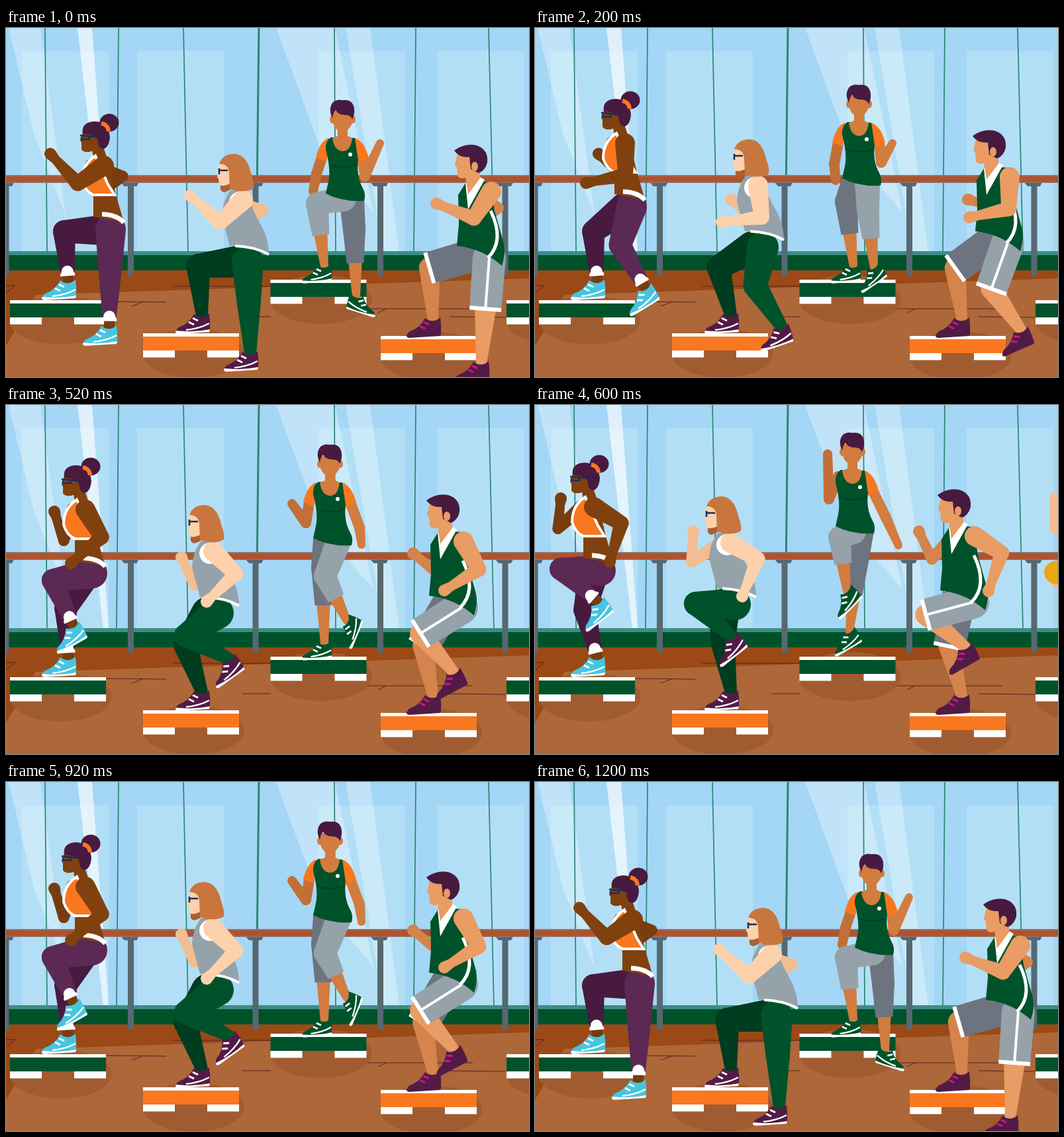
These frames come from a looping animation (790 by 527 pixels, 1.4 s). An HTML page with a canvas:

```html
<!DOCTYPE html>
<html lang="en">
<head>
<meta charset="utf-8">
<title>Step class</title>
<style>
html, body { margin: 0; width: 100%; height: 100%; overflow: hidden; }
canvas { display: block; width: 100%; height: 100%; }
</style>
</head>
<body>
<canvas id="stage" width="790" height="527"></canvas>
<script>
const ctx = document.getElementById('stage').getContext('2d');

const white = '#fff', orange = '#f9771f', green = '#00522b', deepGreen = '#003c1f';
const plum = '#481a40', violet = '#5b2953', grey = '#95a2aa', slate = '#6d747f', navy = '#1c2c5a';
const brown = '#81410f', umber = '#773c10', peach = '#fdd1ab', rose = '#f2bd91';
const tan = '#d27c3f', copper = '#c26f37', sand = '#e99c63', clay = '#d4844c';
const cyanShoe = ['#46c5e0', white, white], plumShoe = ['#521b46', white, white];
const greenShoe = [green, white, white], pinkShoe = ['#521b46', '#521b46', '#d3148c'];

function shape(color, d) {
  ctx.fillStyle = color;
  ctx.fill(new Path2D(d));
}

function line(color, width, d) {
  ctx.strokeStyle = color;
  ctx.lineWidth = width;
  ctx.stroke(new Path2D(d));
}

function rect(color, x, y, w, h) {
  ctx.fillStyle = color;
  ctx.fillRect(x, y, w, h);
}

function oval(color, x, y, rx, ry = rx) {
  ctx.fillStyle = color;
  ctx.beginPath();
  ctx.ellipse(x, y, rx, ry, 0, 0, 7);
  ctx.fill();
}

function at([x, y], draw, angle = 0, size = 1) {
  ctx.save();
  ctx.translate(x, y);
  ctx.rotate(angle * Math.PI / 180);
  ctx.scale(size, Math.abs(size));
  draw();
  ctx.restore();
}

const add = (a, b) => [a[0] + b[0], a[1] + b[1]];
const mix = (a, b, t) => [a[0] + (b[0] - a[0]) * t, a[1] + (b[1] - a[1]) * t];

// Middle joint of a two-bone limb from a to b; side picks which way it folds
function joint(a, b, upper, lower, side) {
  const dx = b[0] - a[0], dy = b[1] - a[1], d = Math.hypot(dx, dy);
  const along = (d * d + upper * upper - lower * lower) / (2 * d);
  const out = side * Math.sqrt(Math.max(0, upper * upper - along * along));
  return [a[0] + (dx * along - dy * out) / d, a[1] + (dy * along + dx * out) / d];
}

// Tapered chain of circles: point, radius, point, radius...
function limb(color, ...n) {
  ctx.fillStyle = color;
  for (let i = 0; i + 3 < n.length; i += 2) {
    const [[x, y], r, [u, v], q] = n.slice(i, i + 4);
    const a = Math.atan2(v - y, u - x);
    const b = Math.acos((r - q) / Math.hypot(u - x, v - y));
    ctx.beginPath();
    ctx.arc(x, y, r, a + b, a - b + 2 * Math.PI);
    ctx.arc(u, v, q, a - b, a + b);
    ctx.fill();
  }
}

// Cloth from a to b, round at a and cut straight at b, with an optional hem
function sleeve(color, a, r, b, q, hem = 0) {
  const length = Math.hypot(b[0] - a[0], b[1] - a[1]);
  const angle = Math.atan2(b[1] - a[1], b[0] - a[0]) * 180 / Math.PI;
  at(a, () => {
    shape(color, `M0 ${-r} A${r} ${r} 0 0 0 0 ${r} L${length} ${q} V${-q}Z`);
    if (hem) line(white, hem, `M${length} ${-q} V${q}`);
  }, angle);
}

// Origin at the ankle, toe to the left
function shoe([body, sole, stripe], [x, y, angle = 0, size = 1]) {
  at([x, y], () => {
    shape(body, 'M11 -3 Q13 10 12 23 L-37 27 Q-42 23 -35 18 Q-20 13 -12 -2 Q0 7 11 -3Z');
    shape(sole, 'M12 21 L11 25 L-36 28 Q-42 27 -39 23 Q-12 26 12 21Z');
    line(sole, 2.5, 'M-24 22 Q-4 20 11 12');
    line(stripe, 3, 'M-20 10 L-12 14 M-14 4 L-6 8');
  }, angle, size);
}

function scenery() {
  rect('#a4d6f6', 0, 0, 790, 340);
  for (const x of [24, 198, 472, 652]) rect('#b3dff6', x, 35, 131, 302);
  shape('rgba(255,255,255,.3)', 'M4 0 H52 L90 282 L42 160Z M408 0 H497 L555 278 L478 190Z M513 0 H550 L594 337 H570Z');
  shape('rgba(255,255,255,.65)', 'M108 0 H130 L155 337 H147Z');
  line('#2a8673', 1.7, 'M59 0 L62 337 M170 0 L167 337 M268 0 L275 337 M496 0 L498 337 M619 0 L616 337 M729 0 L737 337');
  line('#2a8673', 3, 'M382 0 L378 337');
  rect('#3d8e83', 0, 337, 790, 6);
  rect(green, 0, 343, 790, 23);
  rect('#9b4916', 0, 366, 790, 161);
  shape('#ad6738', 'M45 403 L790 378 V527 H0 V480Z');
  for (let i = 0; i < 5; i++) {
    at([i * 188.5, 233], () => shape('#566870', 'M-15 0 H12 L9 6 H4.5 V141 H-4.5 V6 H-10Z'));
  }
  rect('#8d7470', 0, 222, 790, 12);
  rect('#b1522b', 0, 224, 790, 8.5);
  line('#592022', 1, 'M0 400 L14 389 H0 M150 413 L242 414 M190 420 L206 414 M253 390 H400 M357 436 H400 M535 424 H705 M562 430 L574 424 M670 436 L755 437');
  for (const [x, y, color] of [[6, 411, green], [207, 461, orange], [399.5, 380, green], [566, 465, orange], [756, 411, green]]) {
    oval('#a05c30', x + 76, y + 30, 77, 37);
    rect(white, x, y, 145, 6);
    rect(color, x, y + 5, 145, 21);
    for (const foot of [x, x + 97]) rect(white, foot, y + 26, 48, 10.5);
  }
}

// Everything in torso() and face() is relative to the head
const bunWoman = {
  skin: brown, shade: umber, shoes: cyanShoe, plant: [94, 383],
  shoulder: [12, 48], farShoulder: [-6, 48], hip: [22, 144], farHip: [12, 145], thigh: 60, shin: 76,
  leg(hip, knee, foot, far) {
    const cuff = mix(foot, knee, .14);
    limb(umber, cuff, 8, foot, 8);
    limb(far ? plum : violet, hip, 23, knee, 17, mix(foot, knee, .25), 11);
    sleeve(white, mix(foot, knee, .2), 9, cuff, 11, 4);
  },
  torso() {
    shape(brown, 'M-8 14 L9 14 L18 40 L30 92 L42 133 L-4 125 V93 L-21 70 Q-18 48 -4 36Z');
    const bra = 'M-1 33 Q-21 45 -21 71 Q-16 87 -4 92 H28 L18 76Z';
    shape(orange, bra);
    line(white, 4, bra);
    line(white, 7, 'M9 121 Q32 122 42 134');
  },
  face() {
    shape(brown, 'M-19 -5 L-24 10 L-22 13 V23 Q-20 28 -10 27 Q4 24 8 6 L4 -8Z');
    oval(plum, 20, -17, 14.5, 13.5);
    shape(plum, 'M-20 0 Q-23 -18 -2 -19 Q18 -18 21 4 Q20 20 11 23 Q3 22 2 8 Q-2 1 -20 0Z');
    line(orange, 6, 'M8 -16 Q18 -14 19 -4');
    line(navy, 2.5, 'M-24 2 L4 5 M-22 4 V8 H-10 V4');
  },
  poses: [
    { head: [136, 160], hand: [67, 190], farHand: [140, 252], foot: [156, 452] },
    { head: [124, 126], hand: [77, 234], farHand: [96, 190], foot: [167, 393, -28] },
    { head: [108, 110], hand: [98, 239], farHand: [73, 161], foot: [102, 334, -26] },
    { head: [77, 106], hand: [113, 237], farHand: [39, 141], foot: [96, 298, -34] }
  ]
};

const bobWoman = {
  skin: peach, shade: rose, shoes: plumShoe, plant: [296, 434],
  shoulder: [13, 41], farShoulder: [-4, 44], hip: [20, 134], farHip: [4, 134], thigh: 59, shin: 75,
  leg(hip, knee, foot, far) {
    limb(far ? deepGreen : green, hip, 24, knee, 18, foot, 9);
  },
  torso() {
    shape(grey, 'M-6 26 Q-19 45 -19 65 L-7 110 Q25 108 52 124 Q52 95 35 70 L15 25Z');
    line(white, 4, 'M1 110 Q30 111 52 123');
    oval(white, 8, 44, 16);
  },
  face() {
    shape('#aa6030', 'M-20 16 Q-24 28 -15 29 L-6 25 V12Z');
    shape(peach, 'M-22 -17 L-26 6 L-24 9 L-23 18 Q-17 21 -6 16 V-14Z');
    shape('#c8763d', 'M-23 -14 Q-18 -29 1 -29 Q19 -27 25 0 Q32 20 28 24 Q12 31 -7 24 L-8 0 Q-9 -14 -23 -14Z');
    line(navy, 2.5, 'M-23 -7 V2 M-23 -4 H-10');
  },
  poses: [
    { head: [345, 219], hand: [278, 253], farHand: [350, 300], foot: [369, 491] },
    { head: [324, 197], hand: [282, 293], farHand: [296, 259], foot: [373, 452, -15] },
    { head: [300, 180], hand: [303, 297], farHand: [265, 230], foot: [338, 384, -32] },
    { head: [282, 167], hand: [313, 289], farHand: [239, 191], foot: [298, 351, -35] }
  ]
};

const man = {
  skin: sand, shade: clay, shoes: pinkShoe, plant: [645, 440],
  shoulder: [31, 48], farShoulder: [0, 47], hip: [28, 148], farHip: [8, 143], thigh: 73, shin: 78,
  leg(hip, knee, foot, far) {
    limb(far ? clay : sand, knee, 16, foot, 8);
    sleeve(far ? slate : grey, hip, 25, knee, 24, 6);
    if (!far) line(white, 4, `M${hip} L${knee}`);
  },
  torso() {
    shape(green, 'M-6 32 L-19 53 L-18 97 L-21 130 Q18 134 47 160 Q53 142 50 127 L36 77 L30 34Z');
    line(white, 5, 'M30 77 Q52 122 26 148');
    shape(white, 'M-8 35 L-4 75 L21 30 L12 25Z');
    shape(sand, 'M-9 18 L-4 52 L14 28 V8Z');
  },
  face() {
    shape(sand, 'M-20 -9 L-24 8 L-21 11 L-20 24 Q-17 30 -7 27 L10 22 L12 -6Z');
    shape(plum, 'M-25 -14 Q-10 -25 8 -22 Q27 -16 25 4 Q22 16 12 20 L0 14 L-2 -4 Q-18 -3 -25 -14Z');
    oval(sand, 6, 10, 5, 7);
  },
  poses: [
    { head: [702, 199], hand: [650, 265], farHand: [707, 300], foot: [718, 506] },
    { head: [686, 177], hand: [656, 286], farHand: [654, 259], foot: [735, 457, -20] },
    { head: [660, 158], hand: [662, 280], farHand: [615, 224], foot: [677, 404, -24] },
    { head: [633, 150], hand: [685, 281], farHand: [580, 191], foot: [651, 366, -26] }
  ]
};

function arm(color, shoulder, hand, upper, lower, r) {
  const elbow = joint(shoulder, hand, upper, lower, -1);
  limb(color, shoulder, r, elbow, r * .75, mix(elbow, hand, .8), 7, hand, 9);
}

function stepper(who, { head, hand, farHand, foot }) {
  const { plant, thigh, shin } = who;
  const hip = add(head, who.hip), farHip = add(head, who.farHip);
  arm(who.shade, add(head, who.farShoulder), farHand, 49, 46, 11);
  who.leg(farHip, joint(farHip, plant, thigh, shin, 1), plant, true);
  shoe(who.shoes, plant);
  who.leg(hip, joint(hip, foot, thigh, shin, 1), foot, false);
  shoe(who.shoes, foot);
  at(head, who.torso);
  arm(who.skin, add(head, who.shoulder), hand, 48, 61, 15);
  at(head, who.face);
}

// Instructor: arms are elbow and hand, legs are knee and foot
const coachPoses = [
  { head: [508, 134], left: [[469, 220], [464, 246]], right: [[542, 224], [565, 174]],
    dark: [[526, 305], [529, 405, 14, -.88]], light: [[470, 265], [481, 360, -2, .88]] },
  { head: [489, 111], left: [[452, 205], [454, 230]], right: [[523, 203], [540, 174]],
    dark: [[470, 262], [481, 360, -2, .88]], light: [[503, 275], [512, 361, -31, .9]] },
  { head: [489, 85], left: [[453, 178], [432, 149]], right: [[534, 185], [537, 211]],
    dark: [[478, 245], [481, 360, -2, .88]], light: [[482, 258], [515, 326, -64, .9]] },
  { head: [479, 67], left: [[444, 142], [442, 74]], right: [[530, 170], [549, 212]],
    dark: [[488, 230], [475, 342, -27, .9]], light: [[460, 200], [471, 280, -42, .95]] }
];

function coachLeg(color, hip, knee, foot) {
  const hem = mix(knee, foot, .5);
  limb(tan, hem, 10, foot, 6);
  shoe(greenShoe, foot);
  limb(color, hip, 19, knee, 17);
  sleeve(color, knee, 17, hem, 13);
}

function coachTop(raised) {
  if (!raised) shape(orange, 'M-20 32 Q-34 36 -40 62 L-24 68Z');
  shape(orange, 'M18 32 Q33 36 40 62 L24 70Z');
  shape(green, 'M-17 31 Q-26 36 -25 50 Q-17 80 -21 98 L-25 116 Q0 129 33 127 Q36 116 31 108 Q21 90 24 66 L19 32Z');
  line('#003f22', 2, 'M-20 72 Q0 80 23 72');
  shape(tan, 'M-7 16 V29 L-15 32 Q-12 52 1 52 Q13 51 15 32 L8 29 V16Z');
  for (const x of [-15, 16]) oval(tan, x, 4, 4, 6);
  shape(tan, 'M-15 -8 V6 Q-12 21 0 23 Q12 21 16 6 V-8Z');
  shape(plum, 'M-15 2 Q-22 -12 -14 -22 Q-8 -27 0 -25 Q16 -27 18 -12 Q19 -4 15 4 Q13 -4 0 -3 Q-8 -5 -10 -10 Q-14 -6 -15 2Z');
  oval(white, 12, 57, 3);
}

function coach({ head, left, right, dark, light }) {
  const raised = left[1][1] < head[1] + 20;
  const legs = () => coachLeg(grey, add(head, light[0][0] < dark[0][0] ? [2, 124] : [13, 122]), ...light);
  limb(copper, add(head, raised ? [-21, 41] : [-31, 62]), 8, left[0], 8, left[1], 7);
  limb(tan, add(head, [31, 62]), 8, right[0], 8, right[1], 6);
  coachLeg(slate, add(head, dark[0][0] > head[0] ? [14, 122] : [-6, 118]), ...dark);
  legs();
  at(head, () => coachTop(raised));
}

function newcomer() {
  limb(rose, [784, 139], 7, [787, 185], 10);
  oval(rose, 789, 262, 12, 15);
  oval('#e8a814', 790, 253, 21, 18);
}

// Four poses played forwards and back, 200 ms each
function frame(now) {
  const beat = Math.floor(now / 200) % 7;
  const pose = Math.min(beat, 6 - beat);
  scenery();
  coach(coachPoses[pose]);
  for (const who of [bunWoman, bobWoman, man]) stepper(who, who.poses[pose]);
  if (pose === 3) newcomer();
  requestAnimationFrame(frame);
}
frame(0);
</script>
</body>
</html>
```
